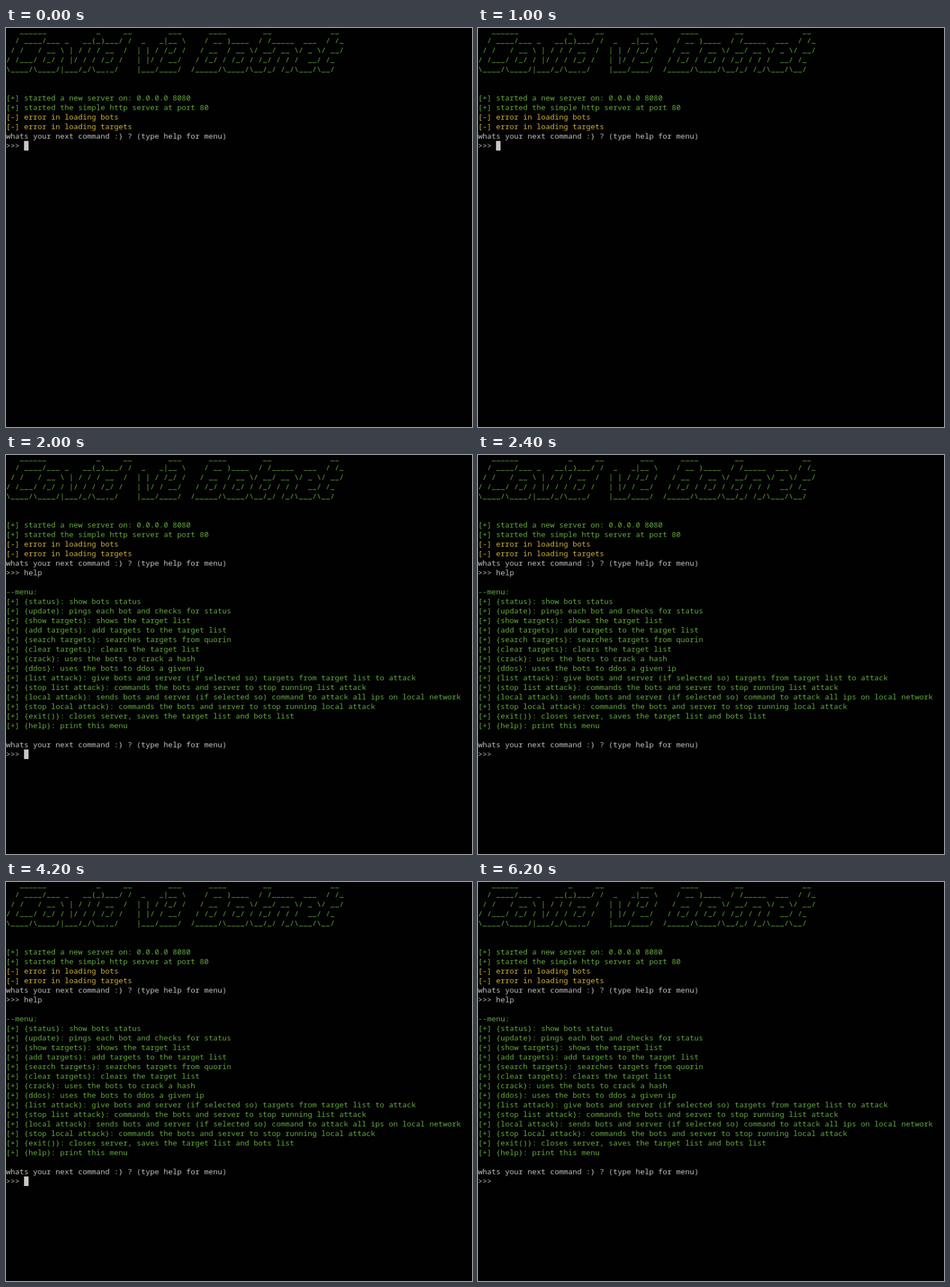
Recreate the animation shown at these times as an HTML page with a canvas. Size 808 by 693 pixels, loop 6400 ms.

```html
<!DOCTYPE html>
<html lang="en">
<head>
<meta charset="utf-8">
<title>Terminal</title>
<style>
  html, body { margin: 0; width: 100%; height: 100%; overflow: hidden; background: #010102; }
  canvas { display: block; }
</style>
</head>
<body>
<canvas id="stage" width="808" height="693"></canvas>
<script>
const view = document.getElementById('stage').getContext('2d');

// The terminal is drawn on a whole-pixel grid, then scaled down to the stage.
const SCALE = 0.976;
const screen = document.createElement('canvas');
screen.width = Math.ceil(808 / SCALE);
screen.height = Math.ceil(693 / SCALE);
const ctx = screen.getContext('2d');

const LOOP = 6400;
const CELL_W = 8, CELL_H = 17, TOP = -3, BASE = 13;
const BG = '#010102', GREEN = '#66b03e', YELLOW = '#d6b63c', GREY = '#c8c8c2';

const BANNER = String.raw`   ______           _     __        ___      ____        __             __
  / ____/___ _   __(_)___/ /  _   _|__ \    / __ )____  / /_____  ___  / /_
 / /   / __ \ | / / / __  /  | | / /_/ /   / __  / __ \/ __/ __ \/ _ \/ __/
/ /___/ /_/ / |/ / / /_/ /   | |/ / __/   / /_/ / /_/ / /_/ / / /  __/ /_
\____/\____/|___/_/\__,_/    |___/____/  /_____/\____/\__/_/ /_/\___/\__/`.split('\n');

const ASK = 'whats your next command :} ? (type help for menu)';
const PROMPT = '>>> ';
const COMMAND = 'help';

const START = [
  '[+] started a new server on: 0.0.0.0 8080',
  '[+] started the simple http server at port 80',
  '[-] error in loading bots',
  '[-] error in loading targets'
];

const MENU = [
  '--menu:',
  '[+] {status}: show bots status',
  '[+] {update}: pings each bot and checks for status',
  '[+] {show targets}: shows the target list',
  '[+] {add targets}: add targets to the target list',
  '[+] {search targets}: searches targets from quorin',
  '[+] {clear targets}: clears the target list',
  '[+] {crack}: uses the bots to crack a hash',
  '[+] {ddos}: uses the bots to ddos a given ip',
  '[+] {list attack}: give bots and server (if selected so) targets from target list to attack',
  '[+] {stop list attack}: commands the bots and server to stop running list attack',
  '[+] {local attack}: sends bots and server (if selected so) command to attack all ips on local network',
  '[+] {stop local attack}: commands the bots and server to stop running local attack',
  '[+] {exit()}: closes server, saves the target list and bots list',
  '[+] {help}: print this menu'
];

const TYPE_START = 1200, KEY_STEP = 200, ENTER = 2000;
const CURSOR_OFF = [[600, 800], [2200, 4000], [4600, 5200], [5800, LOOP]];

function print(text, row, color) {
  const y = TOP + row * CELL_H + BASE;
  ctx.fillStyle = color;
  for (let i = 0; i < text.length; i++) {
    const x = i * CELL_W;
    // underscores are short dashes just under the baseline
    if (text[i] === '_') ctx.fillRect(x + 0.6, y, 6.8, 1);
    else ctx.fillText(text[i], x, y);
  }
}

function printAll(lines, row, color) {
  lines.forEach((line, i) => print(line, row + i, color));
}

function drawCursor(col, row) {
  ctx.fillStyle = GREY;
  ctx.fillRect(col * CELL_W, TOP + row * CELL_H, CELL_W, CELL_H);
}

function draw(t) {
  ctx.fillStyle = BG;
  ctx.fillRect(0, 0, screen.width, screen.height);
  ctx.font = '13.333px "Roboto Mono", "Noto Sans Mono", "DejaVu Sans Mono", monospace';
  ctx.textBaseline = 'alphabetic';

  const keys = Math.floor((t - TYPE_START) / KEY_STEP) + 1;
  const typed = COMMAND.slice(0, Math.max(0, keys));
  const entered = t >= ENTER;

  printAll(BANNER, 0, GREEN);
  printAll(START.slice(0, 2), 7, GREEN);
  printAll(START.slice(2), 9, YELLOW);
  printAll([ASK, PROMPT + typed], 11, GREY);

  if (entered) {
    printAll(MENU, 14, GREEN);
    printAll([ASK, PROMPT], 30, GREY);
  }

  if (!CURSOR_OFF.some(([from, to]) => t >= from && t < to)) {
    drawCursor(PROMPT.length + (entered ? 0 : typed.length), entered ? 31 : 12);
  }

  view.drawImage(screen, 0, 0, screen.width * SCALE, screen.height * SCALE);
}

const begin = performance.now();
function tick() {
  draw((performance.now() - begin) % LOOP);
  requestAnimationFrame(tick);
}
tick();
</script>
</body>
</html>
```
